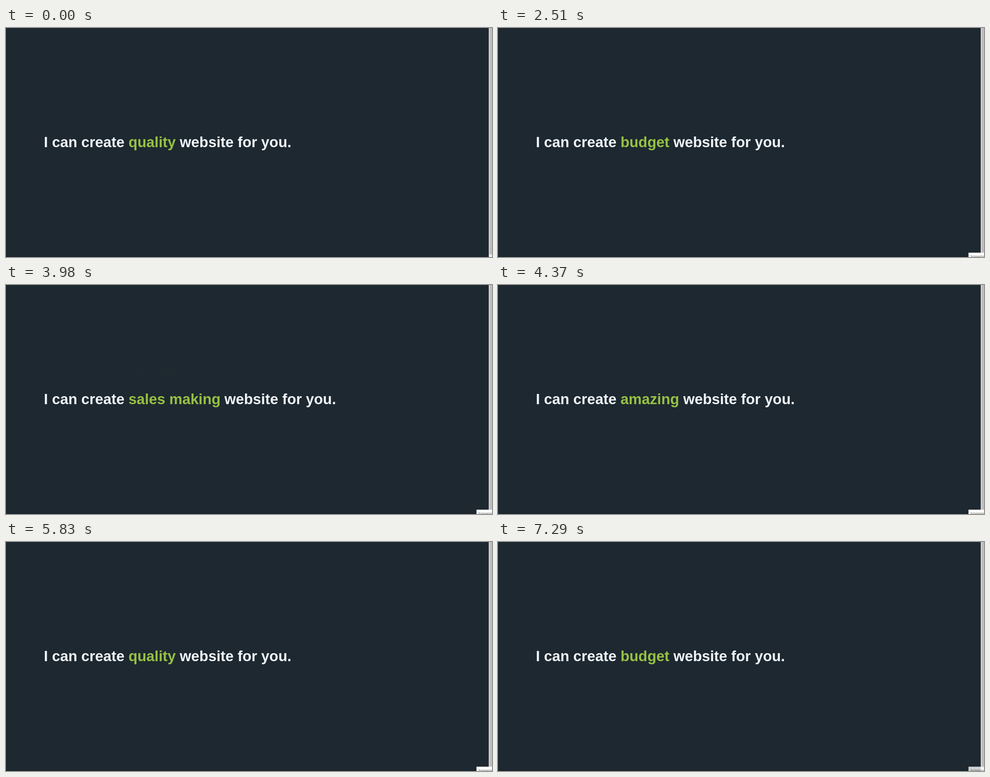
Animation, 1088 px wide and 515 px high, one loop 7320 ms. Source, as an HTML page:

```html
<!DOCTYPE html>
<html lang="en">
<head>
<meta charset="utf-8">
<title>Headline with changing word</title>
<style>
  html, body { margin: 0; width: 100%; height: 100%; overflow: hidden; background: #1e2830; }
  svg { display: block; width: 1088px; height: 515px; }
  .line text { font: bold 32.8px "Liberation Sans", Arial, sans-serif; font-kerning: none; fill: #eff5fa; white-space: pre; }
  .line .word { fill: #96c145; }
  #tip text { font: 6.6px "Open Sans", sans-serif; fill: #575757; }
</style>
</head>
<body>
<svg viewBox="0 0 1088 515">
  <rect y="512" width="1081" height="3" fill="#1b242c"/>
  <rect x="1080.8" width="7.2" height="515" fill="#ececec"/>
  <rect x="1082.3" width="5.7" height="509" fill="#c2bcba"/>
  <g class="line">
    <text id="head" x="84.7" y="268">I can create </text>
    <text id="old" class="word"></text>
    <text id="new" class="word"></text>
    <text id="tail" y="268"> website for you.</text>
  </g>
  <g id="tip">
    <rect x="1053.3" y="505.3" width="40" height="15" fill="#fff"/>
    <text x="1057" y="516.3">Зупинити</text>
  </g>
</svg>
<script>
const LOOP = 7320, LEFT = 84.7, BASE = 268, TRAVEL = 56, SETTLE = 390;
const words = ["quality", "budget", "sales making", "amazing", "quality", "budget"];
// Start of each change in ms, and how far its spring has already run by then
const changes = [[1040, 52], [2510, -2], [3980, 4], [5430, 52], [6900, 66]];

const el = id => document.getElementById(id);
const head = el("head"), tail = el("tail"), oldWord = el("old"), newWord = el("new"), tip = el("tip");
const clamp = v => Math.min(1, Math.max(0, v));

// Underdamped spring from 0 to 1
function spring(ms) {
  if (ms <= 0) return 0;
  if (ms > SETTLE) return 1;
  const t = ms / 1000, omega = 19.5, zeta = 0.52;
  const decay = omega * zeta, freq = omega * Math.sqrt(1 - zeta * zeta);
  return 1 - Math.exp(-decay * t) * (Math.cos(freq * t) + decay / freq * Math.sin(freq * t));
}

const wordX = LEFT + head.getComputedTextLength();
const widths = words.map(word => {
  newWord.textContent = word;
  return newWord.getComputedTextLength();
});

function place(node, word, dy, opacity) {
  if (node.textContent !== word) node.textContent = word;
  node.setAttribute("x", wordX);
  node.setAttribute("y", BASE + dy);
  node.setAttribute("opacity", clamp(opacity));
}

function draw(now) {
  const t = now % LOOP;
  const n = changes.filter(([start]) => t >= start).length;
  const from = Math.max(0, n - 1);
  const p = n ? spring(t - changes[n - 1][0] + changes[n - 1][1]) : 1;

  place(oldWord, words[from], p * TRAVEL, n ? 1 - p : 0);
  place(newWord, words[n], (p - 1) * TRAVEL, p);
  tail.setAttribute("x", wordX + widths[from] + (widths[n] - widths[from]) * p);

  const fadeIn = clamp((t - 1380) / 60), fadeOut = clamp((t - 7270) / 100);
  tip.setAttribute("opacity", fadeIn * (1 - fadeOut));
  requestAnimationFrame(draw);
}
requestAnimationFrame(draw);
</script>
</body>
</html>
```
